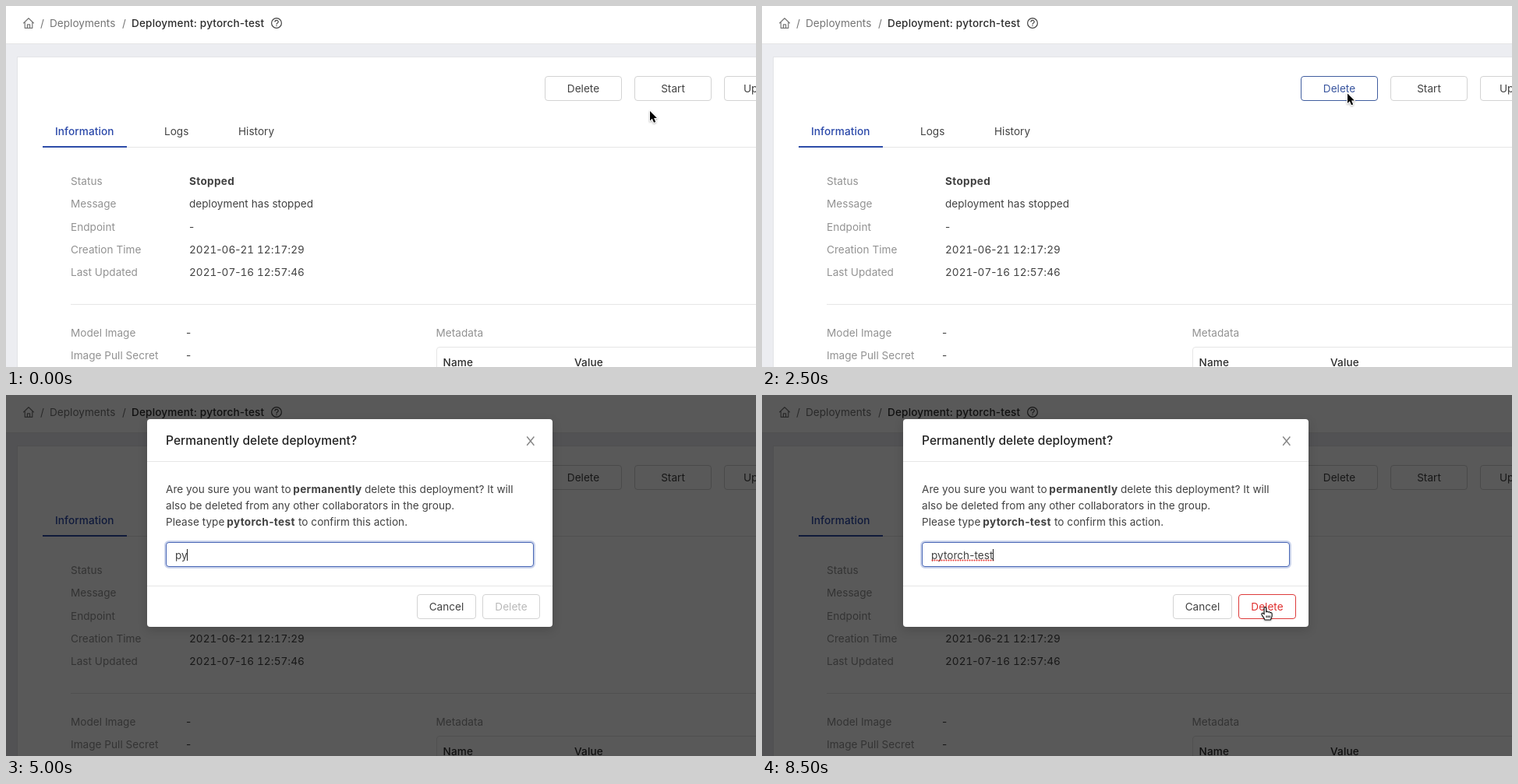
Animation, 962 px wide and 464 px high, one loop 9000 ms. Source, as an HTML page:

```html
<!DOCTYPE html>
<html lang="en">
<head>
<meta charset="utf-8">
<title>Delete deployment</title>
<style>
html, body { margin: 0; width: 100%; height: 100%; overflow: hidden; background: #fff; }
svg { display: block; width: 962px; height: 464px; }
text { font: 13.55px Inter, "Open Sans", sans-serif; letter-spacing: .04px; fill: #424242; white-space: pre; }
.label { fill: #929292; }
.crumb { fill: #757575; }
.strong { font-weight: 500; letter-spacing: .18px; fill: #2c2c2c; }
.bold { font-weight: 700; letter-spacing: .35px; }
.digits { font-feature-settings: "tnum"; }
.active { font-weight: 500; fill: #2a48a9; letter-spacing: .12px; }
.title { font-size: 15.5px; font-weight: 500; letter-spacing: .05px; fill: #222; }
.mid { text-anchor: middle; }
.rule { fill: #e6e6e6; }
.box { fill: #fff; stroke: #d3d3d3; }
.arrow { fill: #000; stroke: #fff; stroke-width: 2; paint-order: stroke; stroke-linejoin: round; }
.cursor { filter: drop-shadow(0 1px 1px rgba(0,0,0,.3)); }
</style>
</head>
<body>
<svg viewBox="0 0 962 464">
  <rect width="962" height="464" fill="#ecedf1"/>
  <rect width="962" height="48" fill="#fff"/>
  <rect class="rule" y="48" width="962" height="1"/>
  <rect x="14.5" y="65.5" width="960" height="420" fill="#fff" stroke="#e3e4e7"/>

  <g fill="none" stroke="#777" stroke-width="1.2" stroke-linejoin="round">
    <path d="M22.3 22.3L29 15.8L35.7 22.3M24.2 21V28.3H33.8V21M27.4 28V23.8H30.6V28"/>
  </g>
  <text class="crumb" x="44" y="27">/</text>
  <text class="crumb" x="56" y="27">Deployments</text>
  <text class="crumb" x="149" y="27">/</text>
  <text class="strong" x="161" y="27">Deployment: pytorch-test</text>
  <g fill="none" stroke="#444" stroke-width="1.2">
    <circle cx="347" cy="22" r="6.4"/>
    <path d="M344.9 20.6C344.9 17.6 349.2 17.7 349.2 20.4C349.2 21.9 347 21.9 347 23.7"/>
    <path d="M347 24.7V26"/>
  </g>

  <rect id="delBox" class="box" x="691.5" y="90.5" width="98" height="31" rx="3.5"/>
  <rect class="box" x="806.5" y="90.5" width="98" height="31" rx="3.5"/>
  <rect class="box" x="921.5" y="90.5" width="98" height="31" rx="3.5"/>
  <text id="delText" class="mid" x="740.5" y="111">Delete</text>
  <text class="mid" x="855.5" y="111">Start</text>
  <text x="946" y="111">Update</text>

  <rect class="rule" x="47" y="181" width="915" height="1"/>
  <rect x="47" y="180" width="108" height="2" fill="#2d4ca8"/>
  <text class="active" x="63" y="166">Information</text>
  <text x="203" y="166">Logs</text>
  <text x="298" y="166">History</text>

  <g id="details"></g>
  <rect class="rule" x="83" y="383" width="879" height="1"/>
  <text class="label" x="551.5" y="425">Metadata</text>
  <rect class="box" x="552.5" y="438.5" width="440" height="60" rx="3.5" style="stroke:#e6e6e6"/>
  <text class="strong" x="560.5" y="463">Name</text>
  <text class="strong" x="729" y="463">Value</text>

  <g id="modal">
    <rect width="962" height="464" fill="#000" fill-opacity=".65"/>
    <rect x="181" y="31" width="520" height="267" rx="4" fill="#fff" style="filter:drop-shadow(0 4px 6px rgba(0,0,0,.15))"/>
    <text class="title" x="205" y="64">Permanently delete deployment?</text>
    <path d="M668.2 53.5L677.4 64.8M677.4 53.5L668.2 64.8" stroke="#858585" stroke-width="1.4"/>
    <rect class="rule" x="181" y="85" width="520" height="1"/>
    <text x="205" y="126">Are you sure you want to</text>
    <text class="bold" x="368.3" y="126">permanently</text>
    <text x="460" y="126">delete this deployment? It will</text>
    <text x="205" y="147">also be deleted from any other collaborators in the group.</text>
    <text x="205" y="168">Please type</text>
    <text class="bold" x="283.3" y="168">pytorch-test</text>
    <text x="375" y="168">to confirm this action.</text>
    <rect id="glow" x="204.5" y="188.5" width="473" height="33" rx="4.5" fill="none" stroke="#2d4fb0" stroke-width="3"/>
    <rect id="input" class="box" x="205.5" y="189.5" width="471" height="31" rx="3.5"/>
    <text id="typed" x="217" y="211"></text>
    <path id="spell" d="M218.5 212.5H297" stroke="#e5342f" stroke-width="2" stroke-linecap="round" stroke-dasharray="0 3"/>
    <rect id="caret" y="198" width="1" height="15" fill="#222"/>
    <rect class="rule" x="181" y="245" width="520" height="1"/>
    <rect class="box" x="527.5" y="256.5" width="75" height="31" rx="3.5"/>
    <text class="mid" x="565" y="277">Cancel</text>
    <rect id="okBox" class="box" x="611.5" y="256.5" width="73" height="31" rx="3.5"/>
    <text id="okText" class="mid" x="648" y="277">Delete</text>
  </g>

  <g class="cursor">
    <path id="arrow" class="arrow" d="M0 0V12.4L2.8 9.8L5 14.8L7.2 13.9L5.1 9H8.9Z"/>
    <path id="beam" d="M-3 -6.5Q0 -6.5 0 -4.5Q0 -6.5 3 -6.5M0 -5V5M-3 6.5Q0 6.5 0 4.5Q0 6.5 3 6.5M-1.5 2.5H1.5" fill="none" stroke="#111" stroke-width="1.2"/>
    <path id="hand" d="M-1.4 .8C-1.4 -.8 1.2 -.8 1.2 .8V6C1.5 4.8 3.7 4.9 3.8 6.3C4.4 5.4 6.2 5.7 6.3 7C7 6.2 8.6 6.7 8.6 8.2V10.5C8.6 12.5 7.4 13.3 7.1 16H-.6C-.9 13.8 -3 12.2 -4.3 9.6C-5.4 7.6 -3.4 6.6 -2.2 8L-1.4 9ZM1.6 10.5V13.3M3.7 10.5V13.3M5.8 10.5V13.3" fill="#fff" stroke="#111" stroke-width="1.1" stroke-linejoin="round"/>
  </g>
</svg>
<script>
const LOOP = 9000, STEP = 500;
const el = id => document.getElementById(id);
const show = (id, on) => { el(id).style.display = on ? "" : "none"; };
const paint = (name, stroke, fill) => {
  el(name + "Box").style.stroke = stroke;
  el(name + "Text").style.fill = fill;
};

const rows = [
  [230, "Status", "Stopped", "bold"],
  [259, "Message", "deployment has stopped"],
  [289, "Endpoint", "-"],
  [318, "Creation Time", "2021-06-21 12:17:29"],
  [347, "Last Updated", "2021-07-16 12:57:46"],
  [425, "Model Image", "-"],
  [454, "Image Pull Secret", "-"]
];
// Only the digits are tabular; punctuation keeps its natural width.
const tabular = text => text.replace(/\d+/g, '<tspan class="digits">$&</tspan>');
el("details").innerHTML = rows.map(([y, label, value, style = ""]) =>
  `<text class="label" x="83" y="${y}">${label}</text>
   <text class="${style}" x="${y > 400 ? 231 : 235}" y="${y}">${tabular(value)}</text>`).join("");

// [time, pointer kind, x, y]
const pointer = [
  [0, "arrow", 826, 135], [1000, "arrow", 761, 119], [1500, "arrow", 751, 112.5],
  [3000, "arrow", 539.5, 179], [3500, "beam", 525, 200], [4000, "beam", 523, 198.5],
  [4500, "none", 0, 0], [8000, "arrow", 693, 271], [8500, "hand", 645.5, 273]
];
// [time, button border, button text]
const hover = [
  [0, "#d3d3d3", "#424242"], [1500, "#a9adc0", "#424242"],
  [2000, "#5873b0", "#425c9f"], [2500, "#415e9f", "#3a569f"], [3000, "#d3d3d3", "#424242"]
];
// [time, letters typed, caret visible]
const typing = [
  [0, 0, false], [4500, 0, true], [5000, 2, true], [5500, 5, true], [6000, 7, true],
  [6500, 7, false], [7000, 11, true], [7500, 12, true], [8000, 12, false], [8500, 12, true]
];
const at = (track, t) => track.filter(key => key[0] <= t).pop();

function draw(t) {
  const [, kind, x, y] = at(pointer, t);
  for (const id of ["arrow", "beam", "hand"]) show(id, id === kind);
  if (kind !== "none") el(kind).setAttribute("transform", `translate(${x} ${y})`);

  const [, border, ink] = at(hover, t);
  paint("del", border, ink);

  show("modal", t >= 3000);
  if (t < 3000) return;
  show("glow", t >= 3500);
  el("glow").style.strokeOpacity = t < 4000 ? .12 : .24;
  el("input").style.stroke = t < 3500 ? "#d3d3d3" : t < 4000 ? "#7389c4" : "#4765b5";

  const [, count, caretOn] = at(typing, t);
  el("typed").textContent = "pytorch-test".slice(0, count);
  const width = count ? el("typed").getComputedTextLength() : 0;
  el("caret").setAttribute("x", Math.floor(217 + width));
  show("caret", caretOn);
  show("spell", t >= 8500);

  if (t >= 7500) paint("ok", "#dd3a3a", "#e0302f");
  else paint("ok", "#d3d3d3", "#b9b9b9");
}

let last = -1;
function tick(now) {
  const t = Math.floor((now % LOOP) / STEP) * STEP;
  if (t !== last) draw(last = t);
  requestAnimationFrame(tick);
}
draw(0);
requestAnimationFrame(tick);
</script>
</body>
</html>
```
